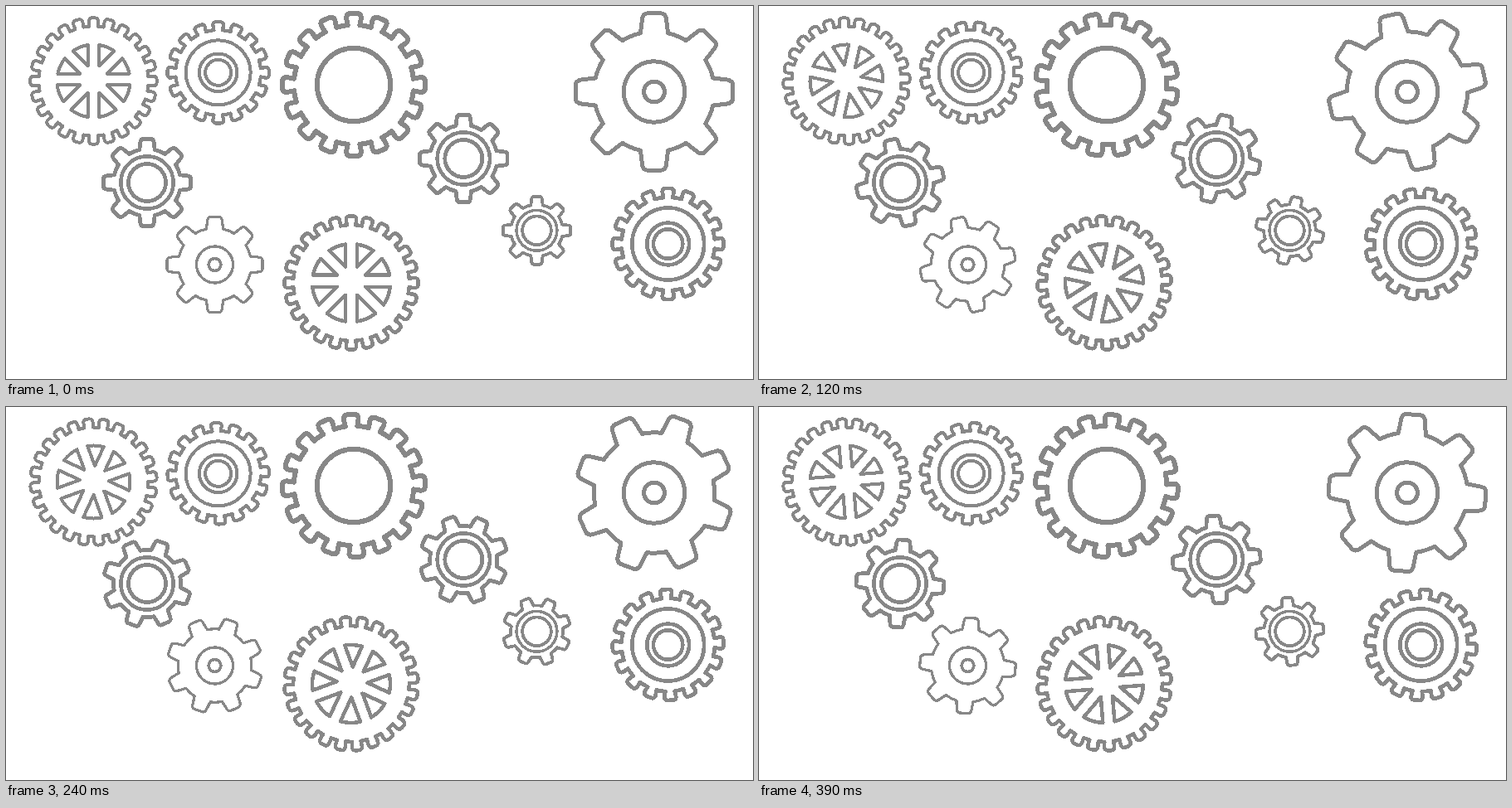
These frames come from a looping animation (900 by 450 pixels, 420 ms). An HTML page:

```html
<!DOCTYPE html>
<html lang="en">
<head>
<meta charset="utf-8">
<title>Turning gears</title>
<style>
  html, body { margin: 0; width: 100%; height: 100%; overflow: hidden; background: #fff; }
  svg { display: block; width: 900px; height: 450px; }
</style>
</head>
<body>
<svg id="stage" viewBox="0 0 900 450" fill="none" stroke="#878787" stroke-linejoin="round" shape-rendering="crispEdges"></svg>
<script>
const NS = 'http://www.w3.org/2000/svg';
const stage = document.getElementById('stage');
const STEP = 30, STEPS = 14;
const TURN = 45 / 14.5; // degrees per step
const RAD = Math.PI / 180;

// Tooth profiles: half widths in degrees, root and corner relative to the tip radius
const COG = { teeth: 8, tip: 8, base: 13.2, root: 0.765, corner: 0.055 };
const RING = { teeth: 16, tip: 6.7, base: 5.8, root: 0.84, corner: 0.08 };
const WHEEL = { teeth: 24, tip: 4.7, base: 4.4, root: 0.865, corner: 0.07 };

// circles: [radius, line width]; spokes: [outer radius, half gap, hub lift]
const gears = [
  { x: 105.5, y: 90.5, r: 76.3, w: 4, kind: WHEEL, dir: 1, spokes: [44, 6.7, 2] },
  { x: 416, y: 334, r: 80.7, w: 4.5, kind: WHEEL, dir: 1, spokes: [47, 7.1, 2.3] },
  { x: 255.7, y: 80.3, r: 61.2, w: 4.2, kind: RING, dir: -1, circles: [[39, 4], [22.8, 4], [15.5, 4]] },
  { x: 797.7, y: 287, r: 67, w: 4.8, kind: RING, dir: -1, circles: [[43.5, 4.6], [25.4, 4.6], [17.7, 4.5]] },
  { x: 419, y: 95, r: 86, w: 6, kind: RING, dir: -1, circles: [[44.2, 6]] },
  { x: 781, y: 103.5, r: 95, w: 5, kind: COG, dir: -1, circles: [[36.7, 5], [12.5, 5]] },
  { x: 551.3, y: 184, r: 53, w: 4.8, kind: COG, dir: 1, circles: [[31.7, 4.5], [22.5, 4.8]] },
  { x: 170, y: 213, r: 53, w: 4.8, kind: COG, dir: -1, circles: [[31.7, 4.5], [22.5, 4.8]] },
  { x: 639.5, y: 270.8, r: 41, w: 3.8, kind: COG, dir: 1, circles: [[24.4, 3.5], [17.3, 3.8]] },
  { x: 251.5, y: 312, r: 57.8, w: 3.2, kind: COG, dir: -1, circles: [[22, 3.3], [7.4, 3.6]] }
];

function add(parent, name, attrs) {
  const el = document.createElementNS(NS, name);
  for (const key in attrs) el.setAttribute(key, attrs[key]);
  return parent.appendChild(el);
}

// Point at radius r, angle in degrees clockwise from the top
function polar(r, deg) {
  return [r * Math.sin(deg * RAD), -r * Math.cos(deg * RAD)];
}

function text([x, y]) {
  return x.toFixed(2) + ' ' + y.toFixed(2);
}

function at(r, deg) {
  return text(polar(r, deg));
}

function rim(r, k) {
  const root = r * k.root, cut = r * k.corner;
  const inset = k.corner / RAD * 0.85;
  const side = k.tip + (k.base - k.tip) * cut / (r - root);
  let d = '';
  for (let i = 0; i < k.teeth; i++) {
    const a = i * 360 / k.teeth;
    d += i ? `A${root} ${root} 0 0 1 ` : 'M';
    d += at(root, a - k.base) + 'L' + at(r - cut, a - side)
      + 'Q' + at(r, a - k.tip) + ' ' + at(r, a - k.tip + inset)
      + 'L' + at(r, a + k.tip - inset)
      + 'Q' + at(r, a + k.tip) + ' ' + at(r - cut, a + side)
      + 'L' + at(root, a + k.base);
  }
  return d + `A${root} ${root} 0 0 1 ${at(root, -k.base)}Z`;
}

// Sectors between spokes that meet slightly above the wheel's centre
function wedges([r, gap, lift]) {
  const apex = gap / Math.sin(Math.PI / 8);
  const edge = (a, offset) => {
    const [nx, ny] = polar(offset, a + 90), [ux, uy] = polar(1, a);
    const x = nx, y = ny - lift;
    const along = x * ux + y * uy;
    const reach = Math.sqrt(along * along + r * r - x * x - y * y) - along;
    return text([x + ux * reach, y + uy * reach]);
  };
  let d = '';
  for (let a = 0; a < 360; a += 45) {
    const [x, y] = polar(apex, a + 22.5);
    d += 'M' + text([x, y - lift]) + 'L' + edge(a, gap)
      + `A${r} ${r} 0 0 1 ` + edge(a + 45, -gap) + 'Z';
  }
  return d;
}

for (const g of gears) {
  const place = add(stage, 'g', { transform: `translate(${g.x} ${g.y})`, 'stroke-width': g.w });
  g.spin = add(place, 'g', {});
  add(g.spin, 'path', { d: rim(g.r, g.kind) });
  if (g.spokes) add(g.spin, 'path', { d: wedges(g.spokes) });
  for (const [r, w] of g.circles || []) add(place, 'circle', { r, 'stroke-width': w });
}

function draw(ms) {
  const angle = Math.floor(ms / STEP) % STEPS * TURN;
  for (const g of gears) g.spin.setAttribute('transform', `rotate(${(g.dir * angle).toFixed(3)})`);
}

const start = performance.now();
function tick() {
  draw(performance.now() - start);
  requestAnimationFrame(tick);
}
tick();
</script>
</body>
</html>
```
